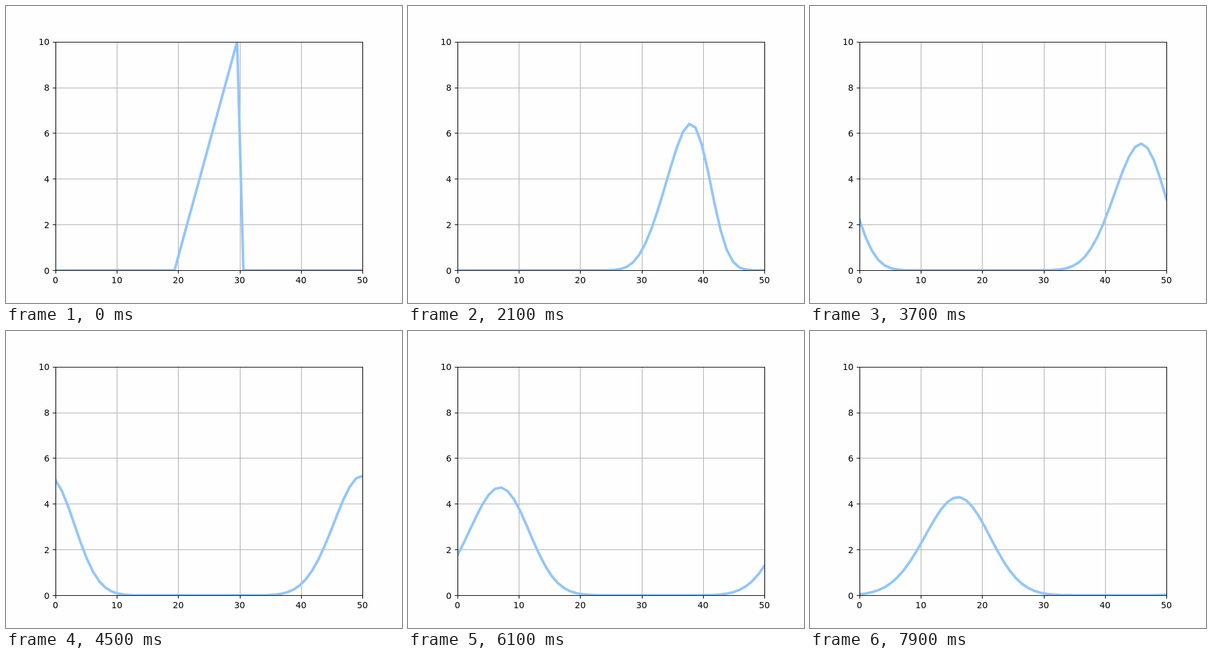
These frames come from a looping animation (640 px wide and 480 px high, 8000 ms). An HTML page:

```html
<!DOCTYPE html>
<html lang="en">
<head>
<meta charset="utf-8">
<title>Advection of a ramp</title>
<style>
  html, body { margin: 0; width: 100%; height: 100%; overflow: hidden; background: #fefefe; }
  svg { display: block; width: 640px; height: 480px; }
  path { fill: none; stroke-width: 1.111; }
  #grid { stroke: #b0b0b0; }
  #axes { stroke: #000; }
  #wave { stroke: #92c6ff; stroke-width: 4.167; stroke-linejoin: round; stroke-linecap: square; }
  text { font: 13.889px "DejaVu Sans", sans-serif; fill: #000; }
</style>
</head>
<body>
<svg viewBox="0 0 640 480">
  <clipPath id="plot"><rect x="80" y="58" width="496" height="369"/></clipPath>
  <path id="grid"/>
  <g clip-path="url(#plot)"><path id="wave"/></g>
  <path id="axes"/>
  <g id="labels"></g>
</svg>
<script>
const COUNT = 50, FRAMES = 80, STEP_MS = 100;
const get = id => document.getElementById(id);
const px = x => 80 + x * 496 / 50;
const py = y => 427.2 - y * 369.6 / 10;
const snap = v => Math.round(v) + 0.5;

function addLabel(value, x, y, anchor) {
  const label = document.createElementNS("http://www.w3.org/2000/svg", "text");
  label.setAttribute("x", x);
  label.setAttribute("y", y);
  label.setAttribute("text-anchor", anchor);
  label.textContent = value;
  get("labels").append(label);
}

function drawAxes() {
  let grid = "", axes = "M80.5 58.5H576.5V427.5H80.5Z";
  for (let i = 0; i <= 5; i++) {
    const x = snap(px(i * 10)), y = snap(py(i * 2));
    grid += `M${x} 58V427M80 ${y}H576`;
    axes += `M${x} 427.5v5M80.5 ${y}h-5`;
    addLabel(i * 10, px(i * 10), 448, "middle");
    addLabel(i * 2, 70.3, Math.round(py(i * 2) + 5.3), "end");
  }
  get("grid").setAttribute("d", grid);
  get("axes").setAttribute("d", axes);
}

const toPath = u => "M" + u.map((v, i) =>
  `${px(i * 50 / (COUNT - 1)).toFixed(2)} ${py(v).toFixed(2)}`).join("L");

// Upwind advection on a periodic grid with Courant number 0.5
const advect = u => u.map((v, i) => (v + u[(i + COUNT - 1) % COUNT]) / 2);

const paths = [];
let wave = Array.from({ length: COUNT }, (_, i) => i > 19 && i < 30 ? i - 19 : 0);
for (let n = 0; n < FRAMES; n++) {
  paths.push(toPath(wave));
  wave = advect(wave);
}

let shown = -1;
function render(time) {
  const n = Math.floor(time / STEP_MS) % FRAMES;
  if (n !== shown) get("wave").setAttribute("d", paths[shown = n]);
  requestAnimationFrame(render);
}

drawAxes();
render(performance.now());
</script>
</body>
</html>
```
